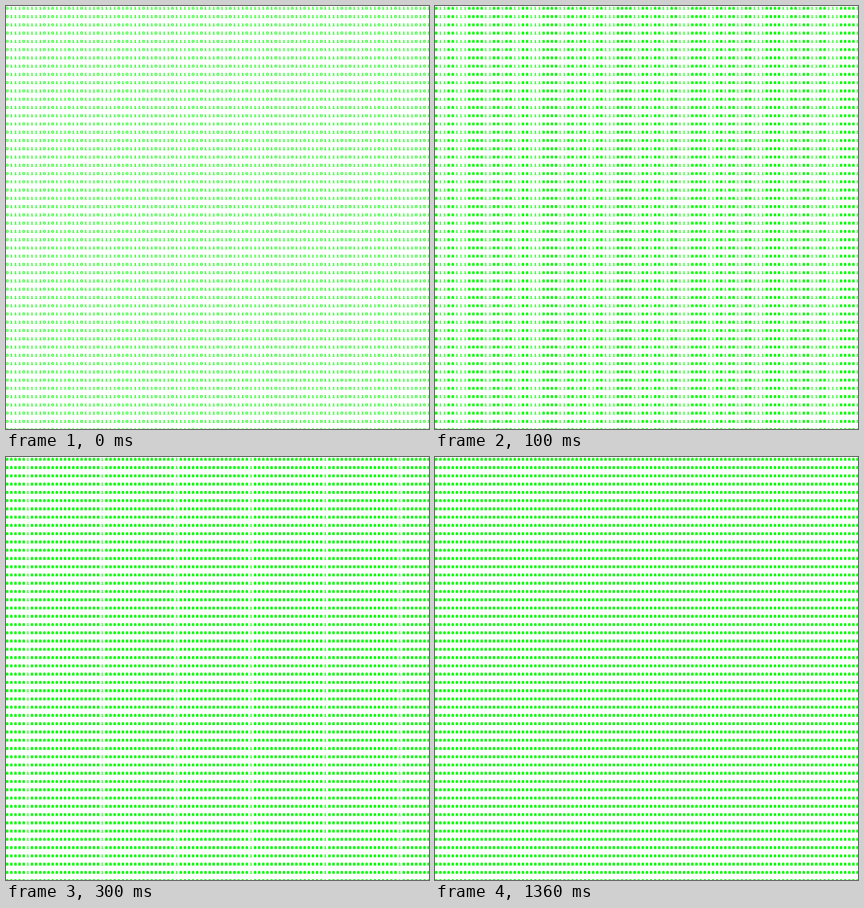
Animation, 748 px wide and 748 px high, one loop 2 s. Source, as an HTML page without scripts:

```html
<!DOCTYPE html>
<html lang="en">
<head>
<meta charset="utf-8">
<title>Binary rain fill</title>
<style>
  html, body { margin: 0; width: 100%; height: 100%; overflow: hidden; background: #fff; }
  svg { display: block; width: 100vw; height: 100vh; fill: #0f0; }
  .cover { fill: #fff; }
  .step { animation: 2s step-end infinite; }
  .s1 { animation-name: hide1; }
  .s2 { animation-name: hide2; }
  .s3 { animation-name: hide3; }
  .s4 { animation-name: hide4; }
  @keyframes hide1 { 0% { opacity: 1 } 5%, 100% { opacity: 0 } }
  @keyframes hide2 { 0% { opacity: 1 } 10%, 100% { opacity: 0 } }
  @keyframes hide3 { 0% { opacity: 1 } 15%, 100% { opacity: 0 } }
  @keyframes hide4 { 0% { opacity: 1 } 20%, 100% { opacity: 0 } }
</style>
</head>
<body>
<svg viewBox="0 0 1024 1024" role="img" aria-label="Rows of binary digits filling up">
  <defs>
    <!-- Digits sit in 10 x 20 cells; "both" is a 0 printed over a 1 -->
    <g id="one">
      <path class="cover" d="M-2 0h10v20h-10z"/>
      <path d="M2 2h2v6h2v1H0v-1h2V4H1V3h1z"/>
    </g>
    <g id="zero">
      <path class="cover" d="M-2 0h10v20h-10z"/>
      <path d="M1 2h4v1h1v5h-1v1h-4v-1h-1v-5h1zM2 3v5h2v-5z"/>
    </g>
    <path id="both" d="M1 2h4v1h1v6H0V3h1z"/>

    <!-- Columns of 64 rows -->
    <g id="one4"><use href="#one"/><use href="#one" y="20"/><use href="#one" y="40"/><use href="#one" y="60"/></g>
    <g id="one16"><use href="#one4"/><use href="#one4" y="80"/><use href="#one4" y="160"/><use href="#one4" y="240"/></g>
    <g id="one64"><use href="#one16"/><use href="#one16" y="320"/><use href="#one16" y="640"/><use href="#one16" y="960"/></g>

    <g id="zero4"><use href="#zero"/><use href="#zero" y="20"/><use href="#zero" y="40"/><use href="#zero" y="60"/></g>
    <g id="zero16"><use href="#zero4"/><use href="#zero4" y="80"/><use href="#zero4" y="160"/><use href="#zero4" y="240"/></g>
    <g id="zero64"><use href="#zero16"/><use href="#zero16" y="320"/><use href="#zero16" y="640"/><use href="#zero16" y="960"/></g>

    <g id="both4"><use href="#both"/><use href="#both" y="20"/><use href="#both" y="40"/><use href="#both" y="60"/></g>
    <g id="both16"><use href="#both4"/><use href="#both4" y="80"/><use href="#both4" y="160"/><use href="#both4" y="240"/></g>
    <g id="both64"><use href="#both16"/><use href="#both16" y="320"/><use href="#both16" y="640"/><use href="#both16" y="960"/></g>

    <!-- The same column repeated every 18 cells -->
    <g id="ones">
      <use href="#one64"/><use href="#one64" x="180"/><use href="#one64" x="360"/>
      <use href="#one64" x="540"/><use href="#one64" x="720"/><use href="#one64" x="900"/>
    </g>
    <g id="zeros">
      <use href="#zero64"/><use href="#zero64" x="180"/><use href="#zero64" x="360"/>
      <use href="#zero64" x="540"/><use href="#zero64" x="720"/><use href="#zero64" x="900"/>
    </g>
    <g id="boths">
      <use href="#both64"/><use href="#both64" x="180"/><use href="#both64" x="360"/>
      <use href="#both64" x="540"/><use href="#both64" x="720"/><use href="#both64" x="900"/>
    </g>
    <g id="trio"><use href="#boths"/><use href="#boths" x="10"/><use href="#boths" x="20"/></g>
  </defs>

  <!-- Filled state, revealed as the digits above it vanish -->
  <use href="#trio"/><use href="#trio" x="30"/><use href="#trio" x="60"/>
  <use href="#trio" x="90"/><use href="#trio" x="120"/><use href="#trio" x="150"/>

  <!-- 011101111010111011: the fill spreads left from each zero -->
  <g class="step s1">
    <use href="#zeros"/><use href="#zeros" x="40"/><use href="#zeros" x="90"/>
    <use href="#zeros" x="110"/><use href="#zeros" x="150"/>
    <use href="#ones" x="30"/><use href="#ones" x="80"/><use href="#ones" x="100"/>
    <use href="#ones" x="140"/><use href="#ones" x="170"/>
  </g>
  <g class="step s2">
    <use href="#ones" x="20"/><use href="#ones" x="70"/><use href="#ones" x="130"/><use href="#ones" x="160"/>
  </g>
  <g class="step s3">
    <use href="#ones" x="10"/><use href="#ones" x="60"/><use href="#ones" x="120"/>
  </g>
  <g class="step s4"><use href="#ones" x="50"/></g>
</svg>
</body>
</html>
```
